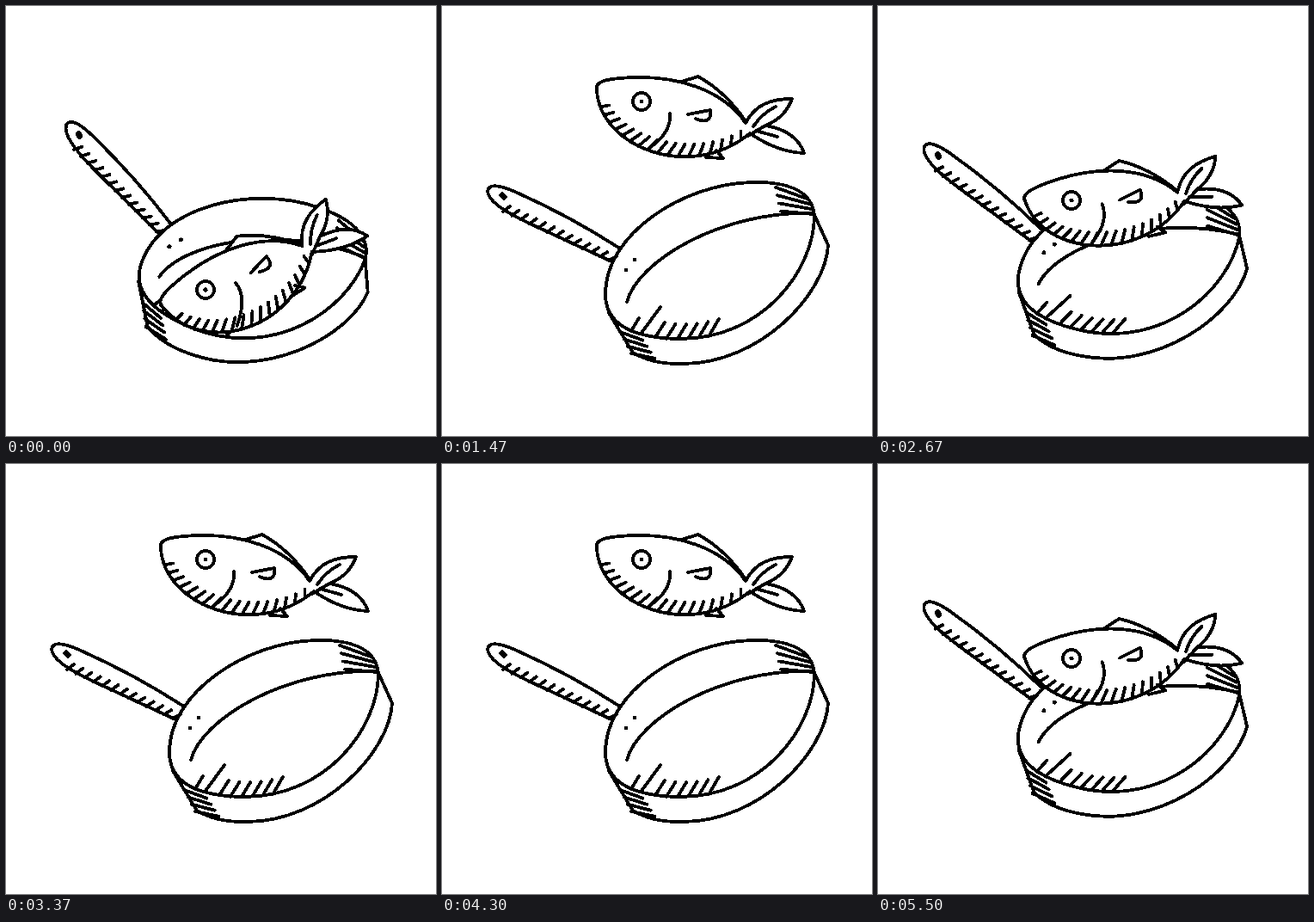
Recreate the animation shown at these times as an HTML page. Size 500 px wide and 500 px high, loop 5710 ms.

```html
<!DOCTYPE html>
<html lang="en">
<head>
<meta charset="utf-8">
<title>Fish in a pan</title>
<style>
html, body { margin: 0; height: 100%; overflow: hidden; background: #fff; }
svg { display: block; width: 100vw; height: 100vh; }
path { fill: none; stroke: #000; stroke-width: 3.8; stroke-linecap: round; stroke-linejoin: round; shape-rendering: crispEdges; }
.solid { fill: #fff; }
.dot { stroke-width: 5; }
.hole { stroke-width: 7; }
</style>
</head>
<body>
<svg id="stage" viewBox="0 0 500 500"></svg>
<script>
const mix = (a, b, t) => a + (b - a) * t;

// Point on a Bezier curve with any number of control points
function bezier(points, t) {
  while (points.length > 1)
    points = points.slice(1).map((p, i) => p.map((v, k) => mix(points[i][k], v, t)));
  return points[0];
}

// Row of ticks along a curve, turning evenly from one angle to another
function hatch(points, n, from, to, length) {
  return Array.from({ length: n }, (_, i) => {
    const u = i / (n - 1);
    const angle = mix(from, to, u) * Math.PI / 180;
    const size = typeof length === "function" ? length(u) : length;
    return `M${bezier(points, u)}l${size * Math.cos(angle)} ${-size * Math.sin(angle)}`;
  }).join("");
}

// Piece of a cubic curve, as its own control points
function slice(points, a, b) {
  const cut = (pts, t) => pts.map((_, i) => bezier(pts.slice(0, i + 1), t));
  const head = cut(points, b);
  return cut(head.reverse(), 1 - a / b).reverse();
}

const path = (d, kind = "") => `<path class="${kind}" d="${d}"/>`;

const panPivot = [71, 221];
const pan =
  path("M207 282Q150 245 85 216Q55 203 53 215Q53 230 100 252L197 297" +
    hatch([[71, 239], [194, 296]], 13, 38, 30, 10)) +
  path("M70 220l2 2", "hole") +
  path("M433 243C430 214 400 204 360 205C280 207 190 265 190 335C190 372 225 386 275 387C372 388 433 308 433 243" +
    "L449 278C446 335 370 416 280 416Q245 417 222 403L194 357" +
    "M215 344C228 296 325 238 431 241") +
  path("M220 378l9 -15M232 380l22 -30" +
    hatch([[248, 385], [280, 391], [312, 381]], 6, 57, 60, 20) +
    hatch([[424, 224], [432, 242]], 4, 160, 175, 38) +
    hatch([[207, 379], [220, 404]], 4, -20, -12, 28)) +
  path("M224 295h0M214 307h0", "dot");

const fishPivot = [232, 111];
// A larger sag gives the fish a deeper belly
function fish(sag) {
  const belly = [[180, 98], [184, 165 + sag], [290, 205 + sag], [358, 148]];
  return path("M353 136C325 95 270 82 225 83C190 84 177 88 180 98C" + belly.slice(1).join(" ") +
      "Q390 170 421 171Q412 145 376 139Q399 130 407 108C385 108 365 113 353 136" +
      "M278 88L298 82Q330 100 353 134M307 176L327 177L319 168", "solid") +
    path("M356 151L376 139M388 117Q372 125 362 140M365 145L390 152" +
      "M286 126L312 121Q314 139 295 131" +
      `M265 125Q267 146 ${244 - sag} ${163 + sag / 2}` +
      "M222 111a10 10 0 1 0 20 0a10 10 0 1 0 -20 0" +
      hatch(slice(belly, 0.1, 0.95), 17, 10, 90, u => 10 + 7 * Math.sin(Math.PI * u))) +
    path("M232 111h0", "dot");
}

const place = (shape, [px, py], [x, y, angle]) =>
  `<g transform="translate(${x} ${y}) rotate(${angle}) translate(${-px} ${-py})">${shape}</g>`;

// Position and angle of pan and fish: resting, lifting, tossed
const poses = [
  { pan: [85, 150, 20], fish: [232, 330, -36], sag: 7 },
  { pan: [70, 174, 11.5], fish: [225, 226, -16], sag: 0 },
  { pan: [71, 221, 0], fish: [232, 111, 0], sag: 0 }
];

const stage = document.getElementById("stage");
stage.innerHTML = poses.map(p =>
  `<g>${place(pan, panPivot, p.pan)}${place(fish(p.sag), fishPivot, p.fish)}</g>`).join("");
const pictures = [...stage.children];

const order = [0, 1, 2, 1];
const holds = [270, 230, 270, 200, 230, 270, 230, 200];
const loop = 5710, bar = 1900;
const start = performance.now();

function poseAt(time) {
  // The final hold lasts a little longer than its bar
  let t = time >= 3 * bar ? bar - 1 : time % bar;
  let i = 0;
  while (t >= holds[i]) t -= holds[i++];
  return order[i % 4];
}

function tick() {
  const now = poseAt(Math.max(0, performance.now() - start) % loop);
  pictures.forEach((g, i) => g.style.display = i === now ? "" : "none");
  requestAnimationFrame(tick);
}
tick();
</script>
</body>
</html>
```
